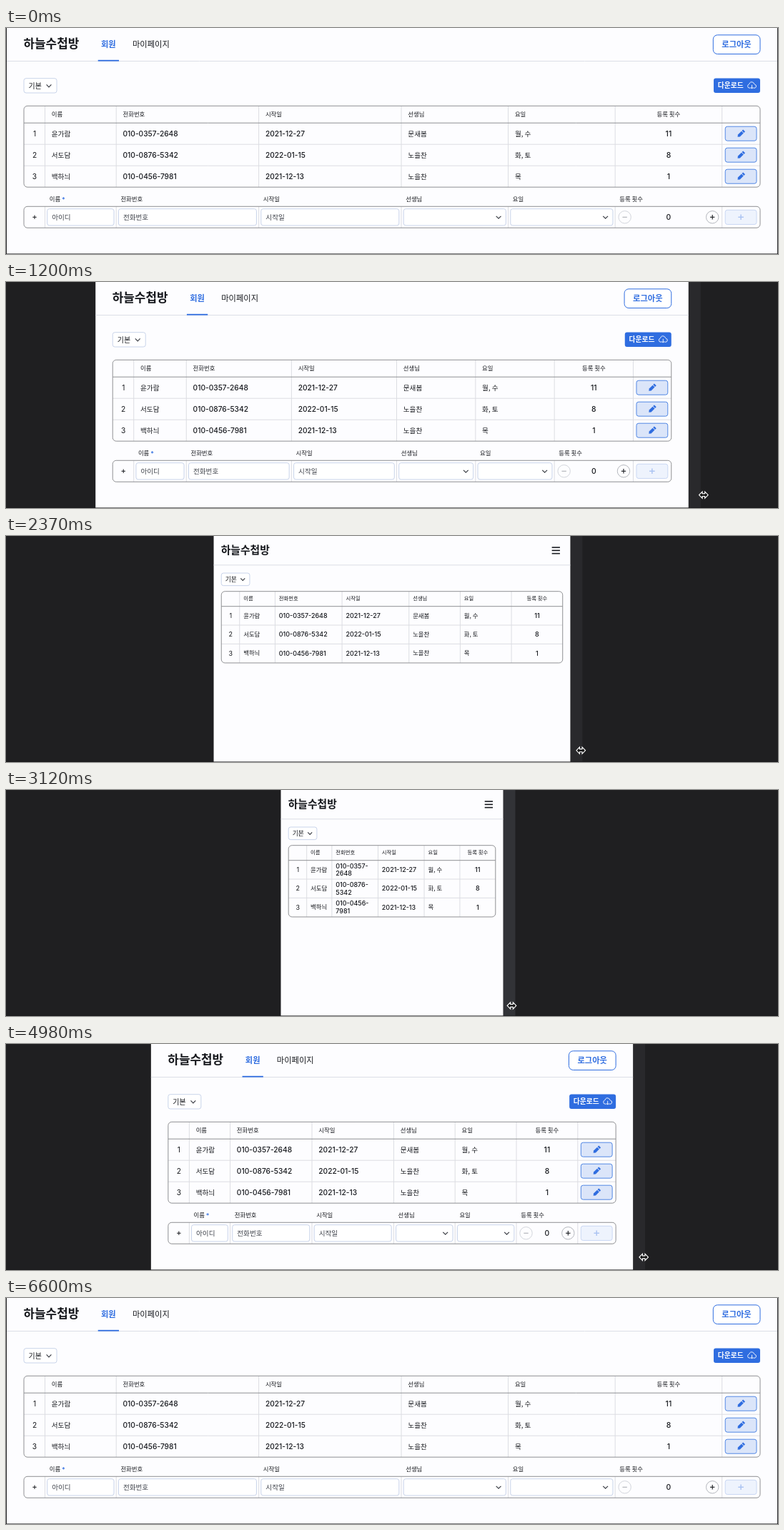
An HTML page with a canvas that plays this animation: 1080 by 317 pixels, repeating every 6630 ms.

```html
<!DOCTYPE html>
<html lang="ko">
<head>
<meta charset="utf-8">
<title>반응형 회원 목록</title>
<style>
html, body { margin: 0; width: 100%; height: 100%; overflow: hidden; background: #1f1f21; }
canvas { display: block; width: 1080px; height: 317px; }
</style>
</head>
<body>
<canvas id="stage"></canvas>
<script>
const W = 1080, H = 317, LOOP = 6630, STEP = 30;
const cv = document.getElementById('stage');
const ratio = window.devicePixelRatio || 1;
cv.width = W * ratio;
cv.height = H * ratio;
const c = cv.getContext('2d');

const BLUE = '#2f6de0', INK = '#16181d', FRAME = '#8f9093', GRID = '#dcdde2', FIELD = '#c9d4ea';
const HANGUL = '"Noto Sans CJK KR", "Noto Sans CJK", sans-serif';
const LATIN = 'Inter, "Noto Sans CJK KR", sans-serif';

const BRAND = '하늘수첩방';
const HEADS = ['이름', '전화번호', '시작일', '선생님', '요일', '등록 횟수'];
const GROW = [2, 4, 4, 3, 3, 3];
const ROWS = [
  ['윤가람', '010-0357-2648', '2021-12-27', '문새봄', '월, 수', '11'],
  ['서도담', '010-0876-5342', '2022-01-15', '노을찬', '화, 토', '8'],
  ['백하늬', '010-0456-7981', '2021-12-13', '노을찬', '목', '1']
];

// left edge of the page and pointer path, as [ms, px]
const EDGE = [[0, 1], [690, 27.8], [1380, 164], [1680, 215.5], [2070, 254], [2760, 341],
  [3120, 384.5], [3510, 384.5], [4260, 286], [4890, 217], [5610, 79], [6270, 5], [6600, 1], [6630, 1]];
const GAP = [[0, 14], [690, 16], [1380, 22], [1680, 14.5], [2070, 15.5], [3120, 12], [3510, 12],
  [4260, 14.5], [4890, 14.8], [5610, 20.3], [6630, 14]];
const LIFT = [[0, 298], [690, 298.5], [1680, 299], [3120, 302.5], [3510, 302.5], [4260, 299], [6630, 299]];

// monotone cubic through the keys
function curve(keys, t) {
  const n = keys.length - 1;
  const slope = i => (keys[i + 1][1] - keys[i][1]) / (keys[i + 1][0] - keys[i][0]);
  const tangent = i => {
    if (i === 0 || i === n) return 0;
    const a = slope(i - 1), b = slope(i);
    return a * b <= 0 ? 0 : 2 * a * b / (a + b);
  };
  let i = 0;
  while (i < n - 1 && t >= keys[i + 1][0]) i++;
  const [t0, v0] = keys[i], [t1, v1] = keys[i + 1], d = t1 - t0;
  const u = (t - t0) / d, u2 = u * u, u3 = u2 * u;
  return v0 * (2 * u3 - 3 * u2 + 1) + v1 * (3 * u2 - 2 * u3) +
    d * (tangent(i) * (u3 - 2 * u2 + u) + tangent(i + 1) * (u3 - u2));
}

function text(s, x, cy, size, { weight = 500, color = INK, align = 'left' } = {}) {
  const korean = /[가-힣]/.test(s);
  const px = korean ? size * 0.94 : size;
  c.font = `${weight} ${px}px ${korean ? HANGUL : LATIN}`;
  c.fillStyle = color;
  c.textAlign = align;
  c.textBaseline = 'alphabetic';
  c.fillText(s, x, cy + px * 0.365);
}

function box(x0, y0, x1, y1, r, stroke, fill) {
  c.beginPath();
  c.roundRect(x0, y0, x1 - x0, y1 - y0, r);
  if (fill) { c.fillStyle = fill; c.fill(); }
  if (stroke) { c.strokeStyle = stroke; c.lineWidth = 1; c.stroke(); }
}

function path(points, color, width = 1) {
  c.beginPath();
  points.forEach(([x, y], i) => i ? c.lineTo(x, y) : c.moveTo(x, y));
  c.strokeStyle = color;
  c.lineWidth = width;
  c.stroke();
}

const hline = (x0, x1, y, color, w) => path([[x0, y], [x1, y]], color, w);
const vline = (x, y0, y1, color, w) => path([[x, y0], [x, y1]], color, w);

function chevron(x, y, s = 1) {
  path([[x - 3.4 * s, y - 1.6 * s], [x, y + 1.8 * s], [x + 3.4 * s, y - 1.6 * s]], '#3c3f46', 1.2);
}

function plus(x, y, r, color, w) {
  hline(x - r, x + r, y, color, w);
  vline(x, y - r, y + r, color, w);
}

function ring(x, y, color) {
  c.beginPath();
  c.arc(x, y, 8.7, 0, 7);
  c.strokeStyle = color;
  c.lineWidth = 1;
  c.stroke();
}

function pencil(x, y) {
  c.save();
  c.translate(x, y);
  c.rotate(-Math.PI / 4);
  c.fillStyle = BLUE;
  c.beginPath();
  c.moveTo(-6.6, 0);
  c.lineTo(-4, -2);
  c.lineTo(3, -2);
  c.lineTo(3, 2);
  c.lineTo(-4, 2);
  c.fill();
  c.fillRect(3.8, -2, 2.4, 4);
  c.restore();
}

function cloud(x, y) {
  c.beginPath();
  c.moveTo(x - 2, y + 3.8);
  c.lineTo(x - 3.2, y + 3.8);
  c.arc(x - 3.2, y + 1.1, 2.7, Math.PI / 2, Math.PI * 1.4);
  c.arc(x - 0.2, y - 0.9, 3.6, Math.PI * 1.1, Math.PI * 1.9);
  c.arc(x + 3.5, y + 1.3, 2.5, Math.PI * 1.55, Math.PI / 2);
  c.lineTo(x + 2, y + 3.8);
  c.strokeStyle = '#fff';
  c.lineWidth = 0.9;
  c.stroke();
  vline(x, y - 0.6, y + 4.6, '#fff', 0.9);
  path([[x - 1.8, y + 2.8], [x, y + 4.7], [x + 1.8, y + 2.8]], '#fff', 0.9);
}

// column edges: fixed index column, then a base plus a share of the rest
function columns(x0, x1, first, base, grow) {
  const unit = (x1 - x0 - first - base * grow.length) / grow.reduce((a, b) => a + b, 0);
  const xs = [x0 + first];
  grow.forEach(g => xs.push(xs[xs.length - 1] + base + g * unit));
  return xs;
}

function grid(x0, x1, ys, xs) {
  const top = ys[0], end = ys[ys.length - 1];
  xs.forEach(x => vline(x, top, end, GRID));
  ys.slice(2, -1).forEach(y => hline(x0, x1, y, GRID));
  if (ys.length > 2) hline(x0, x1, ys[1], FRAME);
  box(x0, top, x1, end, 5, FRAME);
}

function wide(L, R) {
  const x0 = L + 24, x1 = R - 24;
  text(BRAND, x0 - 0.5, 22.3, 18, { weight: 600 });
  text('회원', L + 132, 22.8, 12, { weight: 600, color: BLUE });
  text('마이페이지', L + 176, 22.8, 12);
  hline(L, R, 46.5, '#dcdfe6');
  hline(L + 127.7, L + 157, 45.7, BLUE, 1.8);
  box(x1 - 65.7, 9.8, x1, 36.5, 6, BLUE, '#fff');
  text('로그아웃', x1 - 33, 23, 12, { weight: 600, color: BLUE, align: 'center' });

  box(x0, 70.7, x0 + 46, 91, 3, FIELD, '#fff');
  text('기본', x0 + 6.5, 81, 10.6);
  chevron(x0 + 35, 81);
  box(x1 - 65, 70.5, x1, 91, 3, null, BLUE);
  text('다운로드', x1 - 59.3, 80.6, 10.4, { weight: 600, color: '#fff' });
  cloud(x1 - 11.5, 80.4);

  const xs = columns(x0, x1 - 53.3, 29.5, 0, GROW);
  const last = xs[6], mid = (xs[5] + last) / 2;
  grid(x0, x1, [109.3, 133.2, 163.2, 193.2, 223.2], xs);
  HEADS.forEach((s, i) => i < 5 ? text(s, xs[i] + 9.3, 120.6, 8.9)
    : text(s, mid, 120.6, 8.9, { align: 'center' }));
  ROWS.forEach((row, r) => {
    const y = 148.2 + r * 30;
    text(String(r + 1), x0 + 15, y, 10.2, { weight: 400, align: 'center' });
    row.forEach((s, i) => i < 5 ? text(s, xs[i] + 9.3, y, 10.2)
      : text(s, mid, y, 10.4, { align: 'center' }));
    box(last + 4.5, y - 10, last + 48.3, y + 10, 3, '#5187e4', '#dbe5f9');
    pencil(last + 26.5, y);
  });

  HEADS.forEach((s, i) => text(s, xs[i] + 6.2, 239.7, 8.9, { weight: 400 }));
  text('*', xs[0] + 23.5, 240.6, 9, { color: BLUE });
  grid(x0, x1, [250.3, 280.3], xs);
  plus(x0 + 15, 265.3, 2.7, INK, 1);
  ['아이디', '전화번호', '시작일', '', ''].forEach((s, i) => {
    box(xs[i] + 3.2, 253.7, xs[i + 1] - 3.2, 277, 3, FIELD, '#fff');
    if (s) text(s, xs[i] + 9.7, 265.4, 10.2, { weight: 400, color: '#3f434b' });
    else chevron(xs[i + 1] - 13.5, 265.4);
  });
  ring(xs[5] + 13.5, 265.3, '#d3d6dc');
  hline(xs[5] + 10.3, xs[5] + 16.7, 265.3, '#a5a8ae');
  text('0', mid, 265.3, 10.4, { align: 'center' });
  ring(last - 13.5, 265.3, '#b4b7bd');
  plus(last - 13.5, 265.3, 3.2, INK, 1.1);
  box(last + 4.5, 255.3, last + 48.3, 275.5, 3, '#cad8f4', '#eef3fd');
  plus(last + 26.4, 265.3, 3.8, '#a9c2f2', 1.4);
}

function narrow(L, R) {
  const x0 = L + 10.7, x1 = R - 10.7;
  text(BRAND, x0 - 0.5, 19.3, 15.75, { weight: 600 });
  [16, 20.3, 24.6].forEach(y => hline(R - 25.8, R - 14.5, y, INK, 1.6));
  hline(L, R, 40.8, '#dcdfe6');
  box(x0, 52, x0 + 39.7, 69.6, 3, FIELD, '#fff');
  text('기본', x0 + 5.5, 60.4, 9.3);
  chevron(x0 + 30, 60.8, 0.88);

  const keep = HEADS.map((_, i) => i).filter(i => R - L >= 360 || i !== 3);
  const xs = columns(x0, x1, 25.5, 5.75, keep.map(i => GROW[i]));
  const n = keep.length, mid = (xs[n - 1] + xs[n]) / 2;
  grid(x0, x1, [77.7, 98.7, 125, 151.4, 178], xs.slice(0, n));
  keep.forEach((k, i) => i < n - 1 ? text(HEADS[k], xs[i] + 5.4, 87.4, 7.8)
    : text(HEADS[k], mid, 87.4, 7.8, { align: 'center' }));
  ROWS.forEach((row, r) => {
    const y = 111.9 + r * 26.2;
    text(String(r + 1), x0 + 13, y, 8.95, { weight: 400, align: 'center' });
    keep.forEach((k, i) => {
      const s = row[k], x = xs[i] + 5.4;
      if (i === n - 1) text(s, mid, y, 9.1, { align: 'center' });
      else if (k === 1 && xs[i + 1] - xs[i] < 79) {
        text(s.slice(0, 9), x, y - 5.2, 8.95);
        text(s.slice(9), x, y + 5.2, 8.95);
      } else text(s, x, y, 8.95);
    });
  });
}

function pointer(x, y) {
  c.beginPath();
  [[-6.3, 0], [-1.8, -4.6], [-1.8, -1.9], [1.8, -1.9], [1.8, -4.6], [6.3, 0],
    [1.8, 4.6], [1.8, 1.9], [-1.8, 1.9], [-1.8, 4.6]].forEach(([dx, dy]) => c.lineTo(x + dx, y + dy));
  c.closePath();
  c.fillStyle = '#111';
  c.fill();
  c.strokeStyle = '#fff';
  c.lineWidth = 1.1;
  c.stroke();
}

function draw(t) {
  const L = curve(EDGE, t), R = W - L;
  c.setTransform(ratio, 0, 0, ratio, 0, 0);
  c.fillStyle = '#1f1f21';
  c.fillRect(0, 0, W, H);
  c.fillStyle = t >= 3120 && t < 3540 ? '#323337' : '#29292c';
  c.fillRect(R, 0, 17, H);
  c.fillStyle = '#fdfdff';
  c.fillRect(L, 0, R - L, H);
  (R - L >= 576 ? wide : narrow)(L, R);
  c.fillStyle = 'rgba(20, 20, 22, 0.55)';
  c.fillRect(0, H - 1, W, 1);
  pointer(R + curve(GAP, t), curve(LIFT, t));
}

function tick() {
  const t = performance.now() % LOOP;
  draw(Math.floor(t / STEP) * STEP);
  requestAnimationFrame(tick);
}
tick();
</script>
</body>
</html>
```
